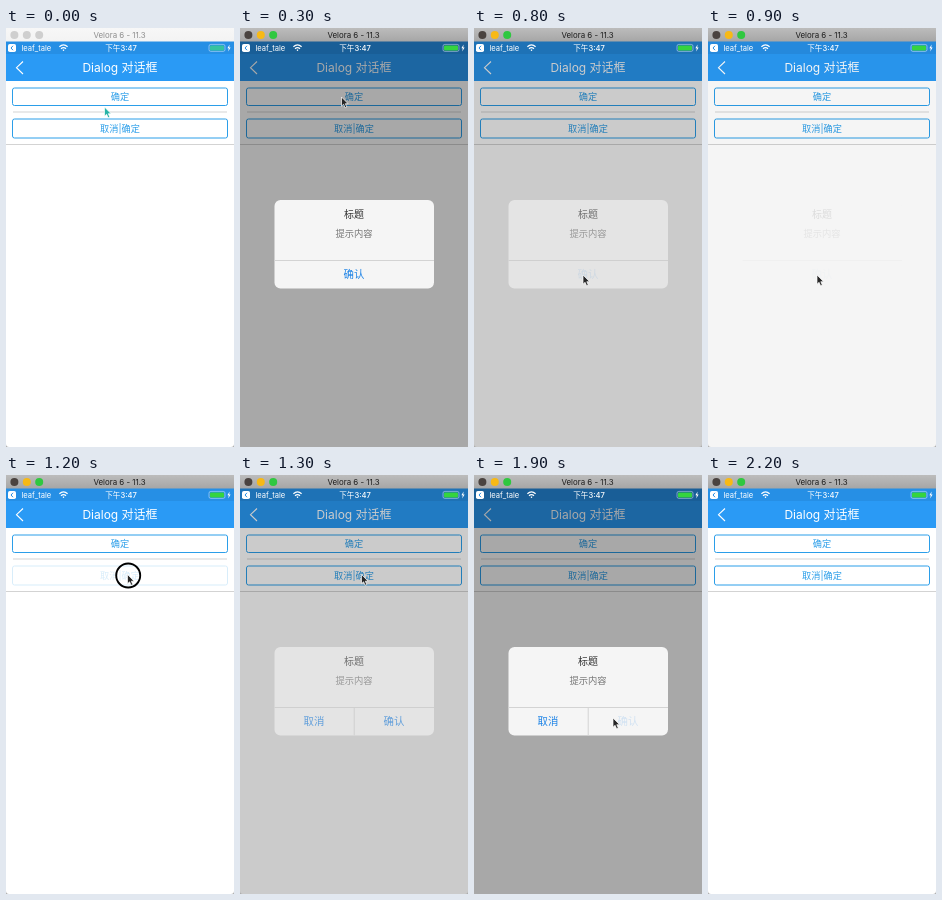
Write an HTML page that moves like this. It is 228 px wide and 419 px high and loops after 2.3 s.

```html
<!DOCTYPE html>
<html lang="zh-CN">
<head>
<meta charset="utf-8">
<title>Dialog 对话框</title>
<style>
  html, body { margin: 0; width: 100%; height: 100%; overflow: hidden; background: #fff; }
  svg { display: block; width: 228px; height: 419px; }
  text {
    font-family: Inter, "Noto Sans CJK SC", "Noto Sans CJK", sans-serif;
    text-anchor: middle;
  }
  .lights circle { fill: #cfcfcf; }
  .bar { fill: url(#idle); }
  .caption { font-size: 7.9px; fill: #8d8d8d; }
  .level { fill: #35c3a0; }
  .active .bar { fill: url(#busy); }
  .active .caption { fill: #1c1c1c; }
  .active .level { fill: #35d43f; }
  .active .lights .close { fill: #4a4340; }
  .active .lights .mini { fill: #f7b916; }
  .active .lights .zoom { fill: #2fc840; }

  .status text { font-size: 7.6px; fill: #fff; }
  .button rect { fill: #fff; stroke: #2b9ee9; stroke-width: 1; }
  .button text { font-size: 9.2px; fill: #2b9ee9; }
  .button.pressed { opacity: .18; }
  .rule { fill: #d3d3d3; }
  .dialog .heading { font-size: 10px; fill: #333; }
  .dialog .message { font-size: 9.3px; fill: #777; }
  .dialog .action { font-size: 10.4px; fill: #1b82e6; }
  .dialog .pressed { opacity: .16; }
  .pointer path { fill: #262626; stroke: #fff; stroke-width: .7; }
  .pointer circle { fill: none; stroke: #000; stroke-width: 1.9; }
  svg:not(.active) .pointer path { fill: #27b3a7; }
</style>
</head>
<body>
<svg id="stage" viewBox="0 0 228 419">
  <defs>
    <linearGradient id="idle" x2="0" y2="1">
      <stop stop-color="#f7f7f7"/><stop offset="1" stop-color="#f3f3f3"/>
    </linearGradient>
    <linearGradient id="busy" x2="0" y2="1">
      <stop stop-color="#bcbcbc"/><stop offset="1" stop-color="#a6a6a6"/>
    </linearGradient>
  </defs>

  <!-- App page -->
  <rect width="228" height="419" fill="#fff"/>
  <rect y="13" width="228" height="40" fill="#2a9af5"/>
  <rect y="13" width="228" height="13" fill="#268fe5"/>
  <path d="M17 33.5 10.5 39.7 17 46" fill="none" stroke="#fff" stroke-width="1.1"/>
  <text x="114" y="44.2" font-size="12" fill="#fff">Dialog 对话框</text>
  <g class="button" id="single">
    <rect x="6.5" y="60" width="215" height="17.5" rx="2"/>
    <text x="114" y="72.3">确定</text>
  </g>
  <rect class="rule" x="7" y="83.5" width="214" height="1"/>
  <g class="button" id="double">
    <rect x="6.5" y="91" width="215" height="19" rx="2"/>
    <text x="114" y="104">取消|确定</text>
  </g>
  <rect class="rule" y="116" width="228" height="1"/>

  <!-- Shade and dialog -->
  <rect id="shade" y="13" width="228" height="406"/>
  <g class="dialog" id="dialog">
    <rect x="34.5" y="172" width="159.5" height="88.5" rx="6" fill="#f5f5f5"/>
    <text class="heading" x="114" y="190.3">标题</text>
    <text class="message" x="114" y="208.6">提示内容</text>
    <rect class="rule" x="34.5" y="232" width="159.5" height="1"/>
    <g id="choice">
      <rect class="rule" x="113.7" y="233" width="1" height="27.5"/>
      <text class="action" x="74" y="250.2">取消</text>
    </g>
    <text class="action" id="confirm" y="250.2">确认</text>
  </g>

  <!-- Status bar -->
  <g class="status">
    <rect x="2" y="16" width="8" height="8" rx="1.8" fill="#fff"/>
    <path d="M7 17.8 5 20 7 22.2" fill="none" stroke="#268fe5"/>
    <text x="30.3" y="22.6">leaf_tale</text>
    <g fill="none" stroke="#fff" stroke-width="1.3">
      <path d="M53.4 18.7Q57.5 15.2 61.6 18.7M55 20.7Q57.5 18.6 60 20.7"/>
      <path d="M57.5 21.5v1.4"/>
    </g>
    <text x="115" y="22.6" font-weight="500">下午3:47</text>
    <rect x="203" y="16.4" width="16" height="7" rx="1.8" fill="none" stroke="#fff" stroke-width=".6" stroke-opacity=".7"/>
    <rect class="level" x="204" y="17.4" width="14" height="5" rx="1"/>
    <path d="M223.6 16.5 221.4 20.3H222.8L222.2 23.5 224.6 19.5H223.2Z" fill="#fff"/>
  </g>

  <!-- Window bar -->
  <rect class="bar" width="228" height="13.5"/>
  <g class="lights">
    <circle class="close" cx="8.4" cy="7" r="4"/>
    <circle class="mini" cx="20.8" cy="7" r="4"/>
    <circle class="zoom" cx="33.2" cy="7" r="4"/>
  </g>
  <text class="caption" x="113.5" y="10">Velora 6 - 11.3</text>
  <path d="M0 416v3h3Q0 419 0 416M228 416v3h-3Q228 419 228 416" fill="#aaa"/>

  <g class="pointer" id="pointer">
    <circle id="ring" cx=".7" cy="1" r="12"/>
    <path d="M0 0V9.2L2.1 7.3 3.6 10.8 5.3 10 3.8 6.7H6.6Z"/>
  </g>
</svg>

<script>
  const STEP = 100, STEPS = 23;
  const el = id => document.getElementById(id);
  const stage = el('stage');

  // Pointer stops: step, x, y
  const stops = [
    [0, 98.5, 79], [1, 101.5, 69], [4, 101.5, 69], [7, 109, 247],
    [9, 109, 247], [12, 121.5, 99.5], [15, 121.5, 99.5], [18, 139, 243], [20, 139, 243]
  ];
  const clicks = [1, 7, 12, 18];

  const ease = u => u * u * (3 - 2 * u);

  function pointerAt(step) {
    const next = stops.findIndex(s => s[0] >= step);
    const b = stops[next], a = stops[Math.max(0, next - 1)];
    const u = a === b ? 0 : ease((step - a[0]) / (b[0] - a[0]));
    return [1, 2].map(i => a[i] + (b[i] - a[i]) * u);
  }

  // Fades in over two steps from open, out over three from close
  function fade(step, open, close) {
    if (step < open || step > close + 1) return 0;
    if (step === open) return 0.6;
    return step < close ? 1 : step === close ? 0.6 : 0.12;
  }

  function draw(step) {
    const two = step >= 12;
    const shown = two ? fade(step, 13, 20) : fade(step, 2, 8);
    const press = (id, on) => el(id).classList.toggle('pressed', on);

    stage.classList.toggle('active', step > 0);
    press('single', step === 1);
    press('double', step === 12);
    press('confirm', two ? step >= 18 : step >= 7);

    el('shade').setAttribute('opacity', 0.34 * shown);
    el('dialog').setAttribute('opacity', shown);
    el('choice').setAttribute('visibility', two ? 'visible' : 'hidden');
    el('confirm').setAttribute('x', two ? 154 : 114);

    const visible = step <= 20;
    el('pointer').setAttribute('display', visible ? 'inline' : 'none');
    if (visible) el('pointer').setAttribute('transform', `translate(${pointerAt(step)})`);
    el('ring').setAttribute('display', clicks.includes(step) ? 'inline' : 'none');
  }

  const start = performance.now();
  function tick() {
    const elapsed = Math.max(0, performance.now() - start);
    draw(Math.floor(elapsed / STEP) % STEPS);
    requestAnimationFrame(tick);
  }
  draw(0);
  requestAnimationFrame(tick);
</script>
</body>
</html>
```
